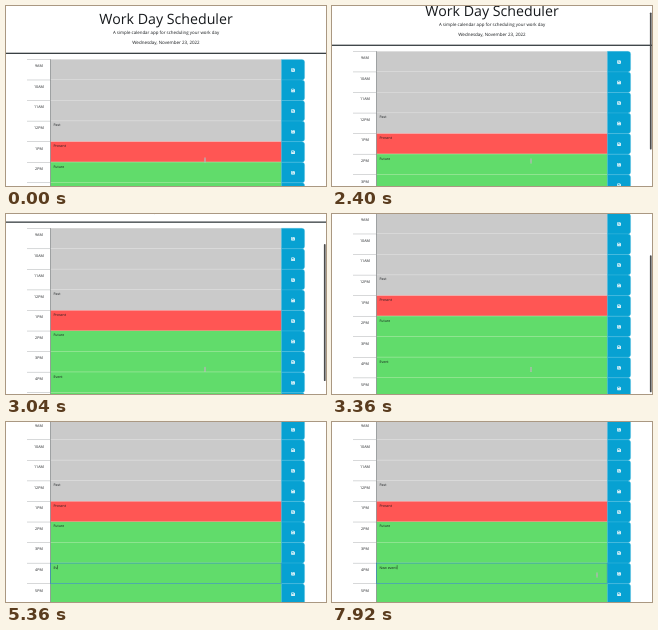
These frames come from a looping animation (320x180 px, 8000 ms). An HTML page:

```html
<!DOCTYPE html>
<html lang="en">
<head>
<meta charset="utf-8">
<title>Work Day Scheduler</title>
<style>
  html, body { margin: 0; width: 100%; height: 100%; overflow: hidden; background: #fff; }
  svg { display: block; width: 100vw; height: 100vh; }
  text { font-family: "Open Sans", sans-serif; fill: #16191c; text-rendering: geometricPrecision; }
  .mid { text-anchor: middle; }
</style>
</head>
<body>
<svg id="stage" viewBox="0 0 320 180"></svg>
<script>
const LOOP = 8000, TOP = 53.4, ROW = 20.56;
const COLORS = { past: '#cacaca', present: '#ff5654', future: '#61dc6b' };
const HOURS = ['9AM', '10AM', '11AM', '12PM', '1PM', '2PM', '3PM', '4PM', '5PM'];
const NOTES = { 3: 'Past', 4: 'Present', 5: 'Future', 7: 'Event' };
const EDITED = 7, NOTE_X = 47.5, NOTE_SIZE = 3.5;

// time, value(s)
const SCROLL = [[1950, 0], [2400, 8], [2800, 24.5], [3120, 44], [3360, 54], [3700, 56.2]];
const MOUSE = [[0, 199, 154], [3450, 199, 155.5], [4250, 110, 150], [4400, 110, 150],
  [4750, 62, 147], [7400, 62, 147], [7880, 265, 153]];
const TYPING = [[0, 'Event'], [5100, 'Even'], [5220, 'Eve'], [5340, 'Ev'], [5460, 'E'],
  [5580, ''], [5900, 'N'], [6080, 'Ne'], [6260, 'New'], [6560, 'New '], [6720, 'New e'],
  [6860, 'New ev'], [7000, 'New eve'], [7120, 'New even'], [7240, 'New event']];
const FOCUS_AT = 4900, HIDE_AT = 5100, SHOW_AT = 7400;

const stage = document.getElementById('stage');

function add(parent, tag, attrs, content) {
  const el = document.createElementNS('http://www.w3.org/2000/svg', tag);
  for (const key in attrs) el.setAttribute(key, attrs[key]);
  if (content) el.textContent = content;
  parent.appendChild(el);
  return el;
}

const rect = (parent, x, y, width, height, fill) =>
  add(parent, 'rect', { x, y, width, height, fill });

const label = (parent, x, y, size, content, cls = 'mid') =>
  add(parent, 'text', { x, y, 'font-size': size, class: cls }, content);

function sample(keys, t, col = 1) {
  if (t <= keys[0][0]) return keys[0][col];
  for (let i = 1; i < keys.length; i++) {
    const a = keys[i - 1], b = keys[i];
    if (t < b[0]) return a[col] + (b[col] - a[col]) * (t - a[0]) / (b[0] - a[0]);
  }
  return keys[keys.length - 1][col];
}

const step = (keys, t) => keys.reduce((v, k) => t >= k[0] ? k[1] : v, keys[0][1]);

function buildRow(parent, hour, i) {
  const y = TOP + i * ROW;
  const kind = i < 4 ? 'past' : i === 4 ? 'present' : 'future';
  rect(parent, 21, y - 0.2, 24, 0.45, '#a5a9ab');
  label(parent, 32.9, y + 7.9, 3.7, hour);
  rect(parent, 44.6, y, 231, ROW, COLORS[kind]);
  rect(parent, 44.6, y + ROW - 0.45, 231, 0.45, kind === 'past' ? '#e6e6e6' : '#b9e8ac');
  rect(parent, 44.2, y, 0.6, ROW, '#6c7072');
  add(parent, 'path', {
    d: `M275.4 ${y}h20.4q2.8 0 2.8 2.8v${ROW - 5.6}q0 2.8 -2.8 2.8h-20.4z`,
    fill: '#07a1d2', stroke: '#5cc3e2', 'stroke-width': 0.25
  });
  const icon = add(parent, 'g', { transform: `translate(285.3 ${y + 8.8})` });
  add(icon, 'path', { d: 'M0.3 0h2.4l0.8 0.8v2.4q0 .3 -.3 .3h-2.9q-.3 0 -.3 -.3v-2.9q0 -.3 .3 -.3z', fill: '#fff' });
  rect(icon, 0.6, 0.5, 1.7, 0.8, '#07a1d2');
  add(icon, 'circle', { cx: 1.75, cy: 2.35, r: 0.55, fill: '#07a1d2' });
  return label(parent, NOTE_X, y + 5.4, NOTE_SIZE, NOTES[i], '');
}

rect(stage, 0, 0, 320, 180, '#fff');
const page = add(stage, 'g', {});
label(page, 160, 17.7, 14.2, 'Work Day Scheduler');
label(page, 160, 27.8, 4.43, 'A simple calendar app for scheduling your work day');
label(page, 160, 37.7, 4.5, 'Wednesday, November 23, 2022');
rect(page, 0, 46.7, 320, 1.25, '#30373a');
const notes = HOURS.map((hour, i) => buildRow(page, hour, i));

const editTop = TOP + EDITED * ROW;
const focus = add(page, 'rect', {
  x: 44.6, y: editTop, width: 230.6, height: ROW - 0.3,
  fill: 'none', stroke: '#2388b8', 'stroke-width': 0.6
});
const caret = rect(page, 0, editTop + 2, 0.4, 4.2, '#111');

const bar = add(stage, 'rect', { x: 317.9, width: 1.7, height: 137, rx: 0.85, fill: '#4b4b4b' });

const mouse = add(stage, 'g', {});
const beam = 'M-.9 -2q.9 0 .9 .6v2.8q0 .6 -.9 .6M.9 -2q-.9 0 -.9 .6v2.8q0 .6 .9 .6';
add(mouse, 'path', { d: beam, fill: 'none', stroke: '#fff', 'stroke-width': 0.9, opacity: 0.7 });
add(mouse, 'path', { d: beam, fill: 'none', stroke: '#555', 'stroke-width': 0.3 });

const show = (el, on) => el.setAttribute('visibility', on ? 'visible' : 'hidden');

function draw(t) {
  const scroll = sample(SCROLL, t);
  page.setAttribute('transform', `translate(0 ${-scroll})`);

  bar.setAttribute('y', 0.4 + scroll * 0.756);
  bar.setAttribute('opacity', t < 1950 ? 0 : sample([[4000, 1], [4220, 0]], t));

  const value = step(TYPING, t), note = notes[EDITED];
  if (note.textContent !== value) note.textContent = value;
  const focused = t >= FOCUS_AT;
  show(focus, focused);
  show(caret, focused);
  if (focused) {
    const space = value.endsWith(' ') ? NOTE_SIZE * 0.26 : 0;
    const width = value ? note.getSubStringLength(0, value.trimEnd().length) : 0;
    caret.setAttribute('x', NOTE_X + 0.2 + width + space);
  }

  show(mouse, t < HIDE_AT || t >= SHOW_AT);
  mouse.setAttribute('transform', `translate(${sample(MOUSE, t)} ${sample(MOUSE, t, 2)})`);
}

const start = performance.now();
function tick() {
  draw((performance.now() - start) % LOOP);
  requestAnimationFrame(tick);
}
tick();
</script>
</body>
</html>
```
